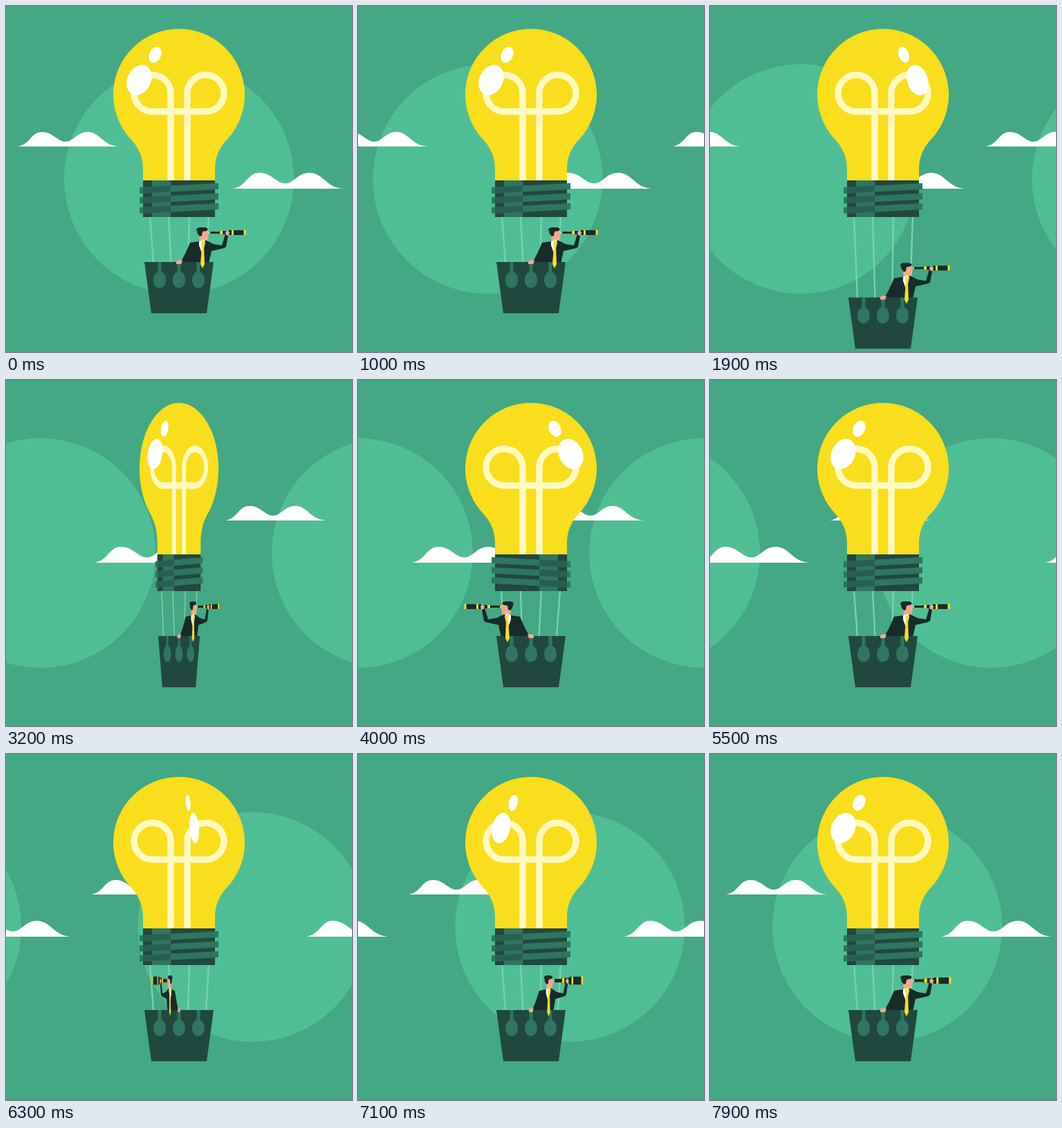
An HTML page for the animation above (8 s loop, 500 px wide and 500 px high).

```html
<!DOCTYPE html>
<html lang="en">
<head>
<meta charset="utf-8">
<title>Light bulb balloon</title>
<style>
  html, body { margin: 0; width: 100%; height: 100%; overflow: hidden; background: #43a883; }
  svg { display: block; width: 100vw; height: 100vh; }
</style>
</head>
<body>
<svg viewBox="0 0 500 500">
  <defs>
    <path id="cloud" fill="#fff" d="M0 0C18-3 19-21 35-21C51-21 57-7 69-7C81-7 85-21 101-21C119-21 123-1 146 0Z"/>
    <g id="scenery">
      <circle cx="250" cy="250" r="166" fill="#50be95"/>
      <use href="#cloud" x="17" y="203"/>
      <use href="#cloud" transform="translate(328 264) scale(1.095)"/>
    </g>
    <path id="bag" fill="#2f7560" d="M-2.5 0H2.5V14C7 16 9 21 9 26C9 33 5 37.500 0 37.500S-9 33-9 26C-9 21-7 16-2.500 14Z"/>
    <g id="thread">
      <path fill="#2f7560" d="M193 262L307 256V265L193 271Z"/>
      <path fill="#285f50" d="M198 261.700L238 259.600V268.600L198 270.700Z"/>
    </g>
  </defs>

  <rect width="500" height="500" fill="#43a883"/>
  <g id="world">
    <use href="#scenery"/>
    <use href="#scenery" x="500"/>
  </g>

  <g id="balloon">
    <path id="ropes" fill="none" stroke="#76d0ad" stroke-width="2.500"/>

    <path fill="#f8de1d" d="M198 253V236C198 216 190 202 178 190A95 95 0 1 1 322 190C310 202 302 216 302 236V253Z"/>
    <path fill="none" stroke="#fff9bf" stroke-width="9.500"
      d="M238 252V126A26.500 26.500 0 0 0 185 126A26.500 26.500 0 0 0 211.500 152.500H288.500A26.500 26.500 0 0 0 315 126A26.500 26.500 0 0 0 262 126V252"/>
    <g id="shine" fill="#fff">
      <ellipse rx="17" ry="23" transform="translate(192.500 107) rotate(25)"/>
      <ellipse rx="8.500" ry="12" transform="translate(215.500 70.500) rotate(25)"/>
    </g>

    <path fill="#20483f" d="M198 252H302V305H198Z"/>
    <path fill="#2f7560" d="M211 252H238V305H211Z"/>
    <use href="#thread"/>
    <use href="#thread" y="14.500"/>
    <use href="#thread" y="29"/>

    <g id="basket">
      <g class="man">
        <path fill="#172b28" d="M266 342L280 340L290 339L300 344L312 346L317 329L321 332L318 348L315 350L297 354L293 372H257L253 369L259 358Z"/>
        <path fill="#f7a78f" d="M279 332L283 324H291L293 330L291 338L286 339L284 342L280 340Z"/>
        <path fill="#172b28" d="M275 322L279 320L288 320L292 322L290 325L284 326L283 332L280 333L277 329Z"/>
        <path fill="#fff" d="M279 340L286 338L288 341L284 360L279 346Z"/>
        <g id="scope">
          <path fill="#172b28" d="M293 326H308V325H322V324H346V331H322V330H308V329H293Z"/>
          <path fill="#f8de1d" d="M293 326H295V329H293ZM309 325H313V330H309ZM326 324H329V331H326ZM343.500 323.500H346.500V331H343.500Z"/>
        </g>
        <path fill="#f7a78f" d="M317 327L320 324L323 327L322 332L318 331Z"/>
      </g>
      <path fill="#20483f" d="M200 370H300L290 444H210Z"/>
      <use href="#bag" x="222" y="370"/>
      <use href="#bag" x="250" y="370"/>
      <use href="#bag" x="278" y="370"/>
      <g class="man">
        <path fill="#f8de1d" d="M282 339L288 341L286 347L287 373L284 379L281 373L283 347Z"/>
        <path fill="#f7a78f" d="M246 369L250 367L255 368L253 373L246 373Z"/>
      </g>
    </g>
  </g>
</svg>

<script>
const LOOP = 8000, STEP = 100, MID = 250;
const $ = id => document.getElementById(id);
const men = document.querySelectorAll('.man');

const clamp = v => Math.max(0, Math.min(1, v));
const part = (t, a, b) => clamp((t - a) / (b - a));
const ease = (t, a, b) => (1 - Math.cos(Math.PI * part(t, a, b))) / 2;
// Rises over a..b, falls back over b..c.
const swing = (t, a, b, c) => ease(t, a, b) - ease(t, b, c);
const flip = (s, y = 0) => `translate(${MID * (1 - s)} ${y}) scale(${s} 1)`;
const set = (el, value) => el.setAttribute('transform', value);

function draw(t) {
  set($('world'), `translate(${-t / LOOP * 500} 0)`);

  // The whole balloon makes one turn.
  set($('balloon'), flip(Math.cos(2 * Math.PI * part(t, 2866, 5134))));

  // The basket sinks on its ropes and is pulled up again.
  const drop = 60 * swing(t, 1000, 2200, 2980);
  set($('basket'), `translate(0 ${drop})`);
  $('ropes').setAttribute('d', [[208, 213], [235, 238.5], [265, 263], [293, 289]]
    .map(([top, end]) => `M${top} 304L${end} ${371 + drop}`).join(''));

  // The shine crosses the glass twice; the second time the man turns along.
  const look = swing(t, 5800, 6600, 7250);
  const roll = swing(t, 1000, 2080, 2800);
  const lift = -12 * Math.sin(Math.PI * part(t, 1000, 1800));
  set($('shine'), flip(1 - 2 * (roll + look), lift));
  men.forEach(man => set(man, flip(1 - 2 * look)));

  // The telescope grows while it points toward the viewer.
  const near = Math.sin(Math.PI * look) + 0.35 * ease(t, 6600, 7250);
  set($('scope'), `translate(293 327.500) scale(${1 + 0.1 * near} ${1 + 0.9 * near}) translate(-293 -327.500)`);
}

function tick(now) {
  draw(Math.floor(now % LOOP / STEP) * STEP);
  requestAnimationFrame(tick);
}
draw(0);
requestAnimationFrame(tick);
</script>
</body>
</html>
```
